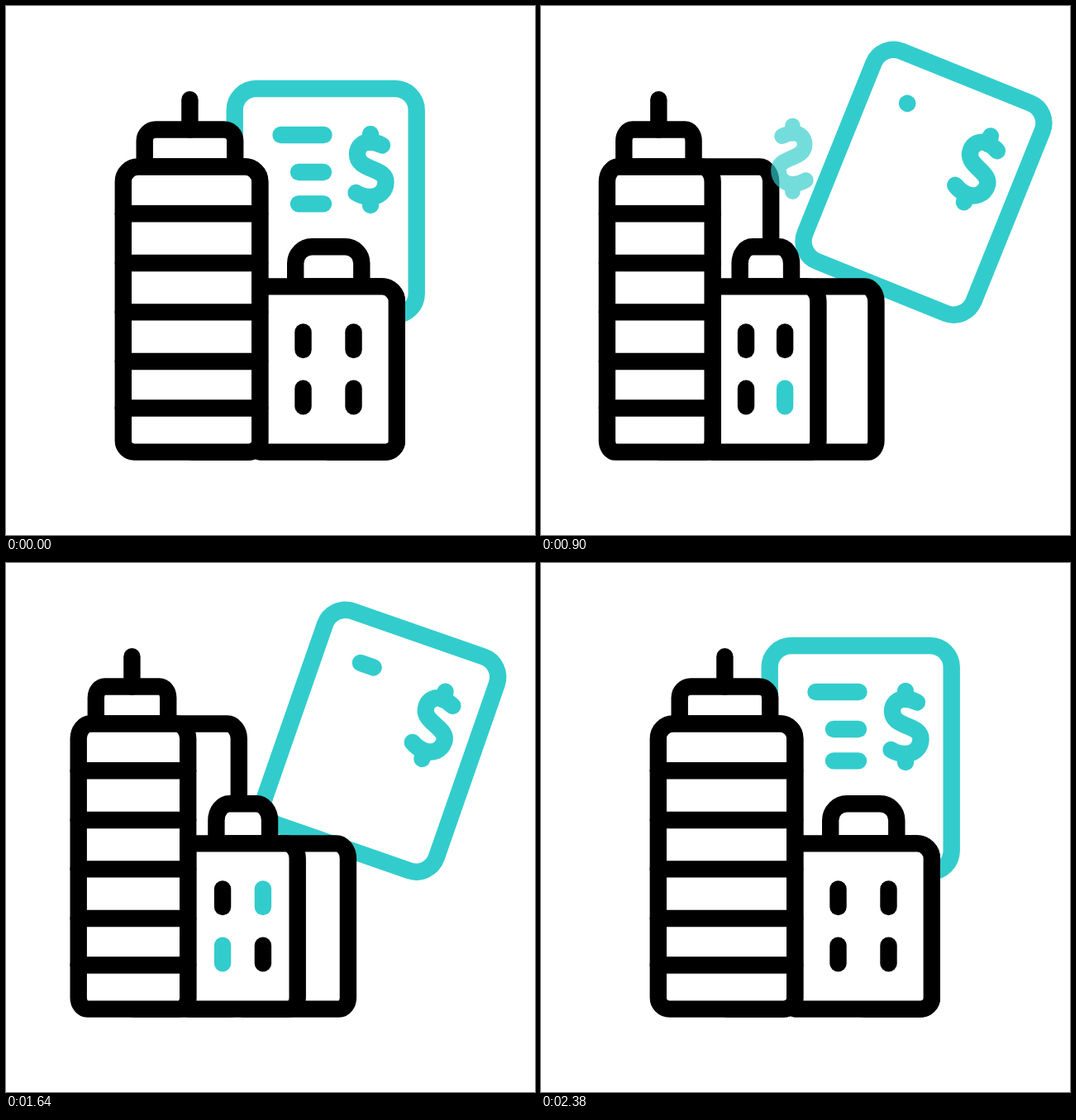
Animation of 640x640 px, one loop 2400 ms. Source, as an HTML page with a canvas:

```html
<!DOCTYPE html>
<html lang="en">
<head>
<meta charset="utf-8">
<title>Office buildings and invoice</title>
<style>
  html, body { margin: 0; width: 100%; height: 100%; overflow: hidden; background: #fff; }
  canvas { display: block; width: 100vmin; height: 100vmin; }
</style>
</head>
<body>
<canvas id="stage" width="640" height="640"></canvas>
<script>
const ctx = document.getElementById('stage').getContext('2d');
const LOOP = 2400, END = 2380;
const TEAL = '#33cccc', BLACK = '#000', WHITE = '#fff';
const LINE = 20.4;
const FLOOR = 539.6, TOWER_TOP = 194.5, SHOP_TOP = 339.4;

const dollar = new Path2D(
  'M14 -29.5 Q6 -33.5 -1 -33.5 C-10 -33.5 -16 -27 -16 -19 ' +
  'C-16 -8 -7 -4.5 1.5 -1 C11 3 18.5 6 18.5 15 ' +
  'C18.5 26 10 33 0 33 C-7 33 -12 31.5 -17.5 28 ' +
  'M0 -43 V-33 M0 33 V43');

const clamp = x => Math.min(1, Math.max(0, x));
const mix = (a, b, s) => a + (b - a) * s;

// cubic-bezier(.75, 0, .25, 1), solved by bisection
function ease(x) {
  x = clamp(x);
  let lo = 0, hi = 1;
  for (let i = 0; i < 24; i++) {
    const m = (lo + hi) / 2, n = 1 - m;
    const at = 2.25 * m * n * n + 0.75 * m * m * n + m * m * m;
    if (at < x) lo = m; else hi = m;
  }
  return lo * lo * (3 - 2 * lo);
}

function bar(x1, y1, x2, y2, color = BLACK) {
  ctx.strokeStyle = color;
  ctx.beginPath();
  ctx.moveTo(x1, y1);
  ctx.lineTo(x2, y2);
  ctx.stroke();
}

// White box with a thick outline; squash narrows the corners sideways
function box(left, right, top, bottom, radii, squash = 1, color = BLACK) {
  ctx.beginPath();
  ctx.roundRect(left, top, right - left, bottom - top,
    radii.map(r => ({ x: r * squash, y: r })));
  ctx.fillStyle = WHITE;
  ctx.fill();
  ctx.strokeStyle = color;
  ctx.stroke();
}

function drawInvoice(t, s) {
  const u = Math.min(t, END - t);
  ctx.save();
  ctx.translate(mix(386.7, 467.3, s), mix(237, 212.4, s) - 10 * s * (1 - s));
  ctx.rotate(23.2 * s * Math.PI / 180);
  box(-110, 110, -137, 137, [26, 26, 26, 26], 1, TEAL);

  // x, y, length, start and end of wiping
  const rows = [
    [-54.2, -81, 52, 390, 905],
    [-32.7, -36, 30, 320, 590],
    [-32.7, 2.4, 30, 260, 560]
  ];
  for (const [x, y, length, start, end] of rows) {
    const left = 1 - clamp((u - start) / (end - start));
    if (left > 0) bar(x, y, x + Math.max(0.01, length * left), y, TEAL);
  }
  ctx.translate(54.3, -39);
  ctx.stroke(dollar);
  ctx.restore();
}

function drawBuildings(t, s) {
  const squash = mix(1, 0.76, s);
  const left = mix(141.8, 76.4, s), wall = mix(307.2, 202, s);
  const towerBack = mix(307.2, 276.5, s);
  const shopFront = mix(472.8, 327.6, s), shopBack = mix(472.8, 401.6, s);

  box((left + wall) / 2, towerBack, TOWER_TOP, FLOOR, [0, 18, 13.5, 0], squash);
  box((wall + shopFront) / 2, shopBack, SHOP_TOP, FLOOR, [0, 18, 13.5, 0], squash);
  box(mix(350.2, 234.4, s), mix(430.3, 295.8, s), 291.3, SHOP_TOP, [20, 20, 0, 0], squash);
  box(wall, shopFront, SHOP_TOP, FLOOR, [0, 18, 13.5, 0], squash);

  const west = mix(359.5, 241.7, s), east = mix(420.5, 288, s);
  const first = t >= 400 && t < 1120, second = t >= 1120 && t < 1840;
  const pane = (x, y, lit) => bar(x, y, x, y + 21.6, lit ? TEAL : BLACK);
  pane(west, 394.5, false);
  pane(east, 394.5, second);
  pane(west, 462.8, second);
  pane(east, 462.8, first);

  box(mix(167.7, 96.5, s), mix(277.2, 179.3, s), 149.5, TOWER_TOP, [13.5, 13.5, 0, 0], squash);
  const mast = mix(222.4, 137.8, s);
  bar(mast, 113.3, mast, 149.5);
  box(left, wall, TOWER_TOP, FLOOR, [18, 18, 13.5, 13.5], squash);
  for (const y of [251.3, 311, 370.4, 430, 486.5]) bar(left, y, wall, y);
}

function drawCoin(t) {
  const alpha = Math.min(clamp((t - 800) / 150), clamp((1600 - t) / 150));
  if (!alpha) return;
  const turn = Math.cos(Math.PI * (t - 1340) / 460);
  ctx.save();
  ctx.globalAlpha = alpha;
  ctx.translate(301.2, 185 - (t - 900) * 0.18);
  ctx.scale(0.926 * turn, 0.926);
  ctx.translate(-3.5, 0);
  ctx.strokeStyle = TEAL;
  ctx.stroke(dollar);
  ctx.restore();
}

function draw(t) {
  const s = Math.min(ease(t / 1200), ease((END - t) / 1190));
  ctx.fillStyle = WHITE;
  ctx.fillRect(0, 0, 640, 640);
  ctx.lineWidth = LINE;
  ctx.lineCap = ctx.lineJoin = 'round';
  drawInvoice(t, s);
  drawBuildings(t, s);
  drawCoin(t);
}

const begin = performance.now();
function tick() {
  draw((performance.now() - begin) % LOOP);
  requestAnimationFrame(tick);
}
tick();
</script>
</body>
</html>
```
